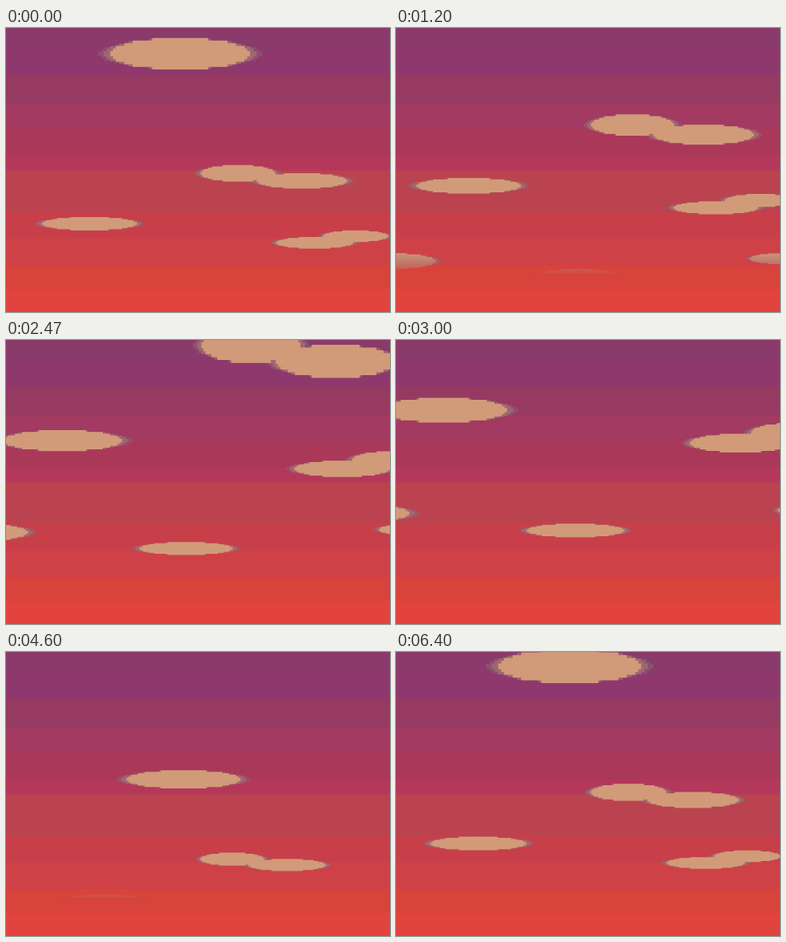
These frames come from a looping animation (480 px wide and 356 px high, 6470 ms). An HTML page with a canvas:

```html
<!DOCTYPE html>
<html lang="en">
<head>
<meta charset="utf-8">
<title>Sunset clouds</title>
<style>
  html, body { margin: 0; width: 100%; height: 100%; overflow: hidden; background: #c83f49; }
  canvas { display: block; width: 480px; height: 356px; }
</style>
</head>
<body>
<canvas id="sky" width="480" height="356"></canvas>
<script>
const ctx = document.getElementById('sky').getContext('2d');
const W = 480, H = 356;
const LOOP = 6470, STEP = LOOP / 97;
const CYCLE = 6113;   // time between two passes of the same cloud

// Sky bands: top edge and colour
const bands = [
  [0, '#8a3a6b'], [28, '#8f386e'], [60, '#963a62'], [96, '#a23a62'],
  [128, '#aa3959'], [162, '#b4385a'], [180, '#ba434f'], [232, '#c83f49'],
  [265, '#ce4147'], [299, '#d8433c'], [329, '#e2433e']
];
const sky = ctx.createLinearGradient(0, 0, 0, H);
bands.forEach(([y, color], i) => {
  sky.addColorStop(y / H, color);
  if (bands[i + 1]) sky.addColorStop((bands[i + 1][0] - 3) / H, color);
});

// Puffs are given as they look near the horizon
const puff = (x, w, h, dy = 0) => ({ x, w, h, dy });
const clouds = [
  { born: 630, puffs: [puff(226, 126, 16)] },
  { born: 2723, puffs: [puff(280, 86, 16), puff(344, 104, 15, 7)] },
  { born: 4060, puffs: [puff(117, 124, 16)] },
  { born: 4640, puffs: [puff(379, 106, 14.5), puff(428, 90, 14.5, -8)] },
  { born: 150, puffs: [puff(-12, 140, 21)] },
  { born: 70, puffs: [puff(481, 90, 14)] }
];

// Clouds melt into the haze near the horizon
function haze(rgb, alpha) {
  const g = ctx.createLinearGradient(0, 278, 0, 309);
  g.addColorStop(0, `rgba(${rgb},${alpha})`);
  g.addColorStop(1, `rgba(${rgb},0)`);
  return g;
}

// Width scale, height scale and fill, from rim to core
const layers = [
  [1.02, 0.84, haze('140,100,118', 0.55)],
  [0.95, 0.92, haze('165,115,114', 0.7)],
  [0.87, 0.96, haze('209,155,121', 1)]
];

// Oval with a stepped outline
function addOval(cx, cy, w, h) {
  const rows = 12, unit = w / 50, right = [], left = [];
  for (let i = 0; i < rows; i++) {
    const p = (i + 0.5) / rows * 2 - 1;
    const half = Math.round(w / 2 * Math.sqrt(1 - p * p) / unit) * unit;
    const top = cy - h / 2 + h * i / rows, bottom = top + h / rows;
    right.push([cx + half, top], [cx + half, bottom]);
    left.push([cx - half, top], [cx - half, bottom]);
  }
  right.concat(left.reverse()).forEach(([x, y], i) => i ? ctx.lineTo(x, y) : ctx.moveTo(x, y));
  ctx.closePath();
}

// Clouds rise faster and spread from the middle as they come near
function drawCloud({ born, puffs }, clock) {
  const age = (clock - born + CYCLE) % CYCLE;
  const y = Math.sqrt(428 * 428 - 29.4 * age) - 98;
  const near = (290 - y) / 260;
  const spread = 1 + 0.6 * near;
  const depth = 1 + 0.3 * near + 1.3 * near * near;
  for (const [sx, sy, fill] of layers) {
    ctx.fillStyle = fill;
    ctx.beginPath();
    for (const p of puffs) {
      addOval(W / 2 + (p.x - W / 2) * spread, y + p.dy * depth,
        p.w * spread * sx, p.h * depth * sy);
    }
    ctx.fill();
  }
}

function draw(now) {
  const t = Math.floor((now % LOOP + 8) / STEP) * STEP % LOOP;
  const clock = t + 170 * Math.max(0, 1 - t / 1200);   // slower start
  ctx.filter = 'none';
  ctx.fillStyle = sky;
  ctx.fillRect(0, 0, W, H);
  ctx.filter = 'blur(0.6px)';
  for (const cloud of clouds) drawCloud(cloud, clock);
}

const start = performance.now();
function tick() {
  draw(performance.now() - start);
  requestAnimationFrame(tick);
}
tick();
</script>
</body>
</html>
```
